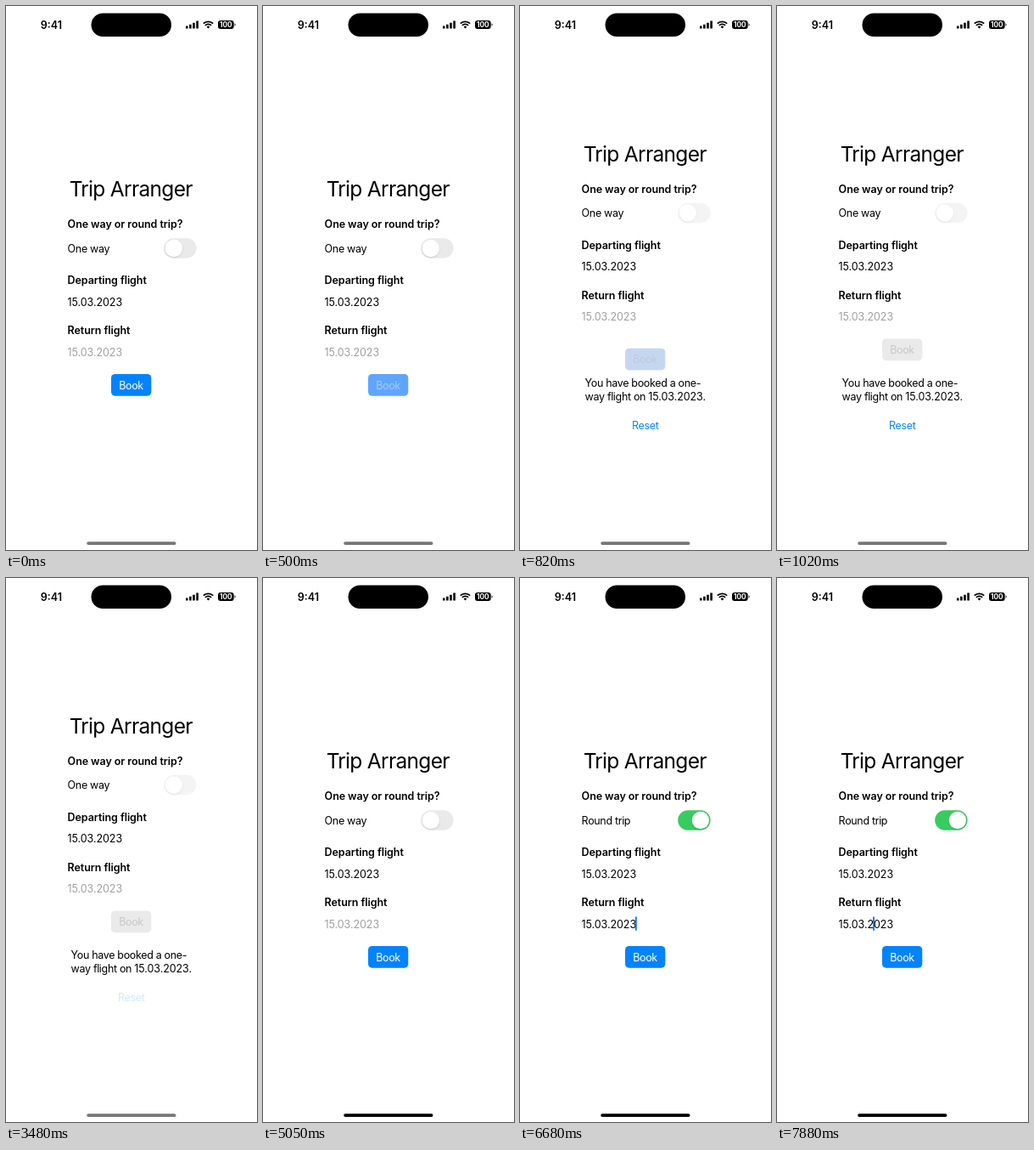
These frames come from a looping animation (296x640 px, 8 s). An HTML page:

```html
<!DOCTYPE html>
<html lang="en">
<head>
<meta charset="utf-8">
<title>Booking form</title>
<style>
  html, body { margin: 0; height: 100%; overflow: hidden; background: #fff; }
  svg { display: block; width: 100vw; height: 100vh; }
  text { font: 12.5px Inter, "Liberation Sans", sans-serif; letter-spacing: -.33px; font-optical-sizing: none; }
  .bold { font-weight: 600; letter-spacing: -.07px; }
  .date { letter-spacing: -.08px; }
  .title { font-size: 24.5px; letter-spacing: -.7px; }
  .mid { text-anchor: middle; }
  .charge { font-size: 8.3px; font-weight: 700; letter-spacing: 0; }
  #knob { filter: drop-shadow(0 1px 1px #0002); }
</style>
</head>
<body>
<svg viewBox="0 0 296 640">
  <text class="bold" x="40.8" y="26.5" style="letter-spacing:0">9:41</text>
  <rect x="100.5" y="8.5" width="94.5" height="27.5" rx="13.75"/>
  <path d="M212 23.5h2.6v3h-2.6zM216.1 21.7h2.6v4.8h-2.6zM220.2 19.7h2.6v6.8h-2.6zM224.3 17.5h2.6v9h-2.6z"/>
  <g fill="none" stroke="#000" stroke-width="1.8">
    <path d="M232.8 20.7a8 8 0 0 1 11.4 0M234.9 22.9a5 5 0 0 1 7.2 0"/>
    <path d="M238.5 26.4l-1.9-1.9a2.7 2.7 0 0 1 3.8 0z" fill="#000" stroke="none"/>
  </g>
  <rect x="250" y="16.9" width="18.7" height="10" rx="3"/>
  <path d="M269.6 20.2a2 2 0 0 1 0 3.5z"/>
  <text class="mid charge" x="259.3" y="25" fill="#fff">100</text>

  <g id="form">
    <text class="mid title" x="147.2" y="224.4">Trip Arranger</text>
    <text class="bold" x="72.6" y="261">One way or round trip?</text>
    <text id="mode" x="72.6" y="289.6"></text>
    <g id="toggle">
      <rect id="track" x="186.2" y="273.3" width="38.4" height="23.4" rx="11.7"/>
      <rect id="knob" y="274.8" height="20.4" rx="10.2" fill="#fff"/>
    </g>
    <text class="bold" x="72.6" y="327">Departing flight</text>
    <text class="date" x="72.6" y="352.6">15.03.2023</text>
    <text class="bold" x="72.6" y="386">Return flight</text>
    <text class="date" id="back" x="72.6" y="411.6">15.03.2023</text>
  </g>
  <rect id="caret" y="398.3" width="2" height="16.7" rx="1" fill="#1a7ff0"/>
  <g id="book">
    <rect id="face" x="124" y="433" width="47.3" height="25.7" rx="4.6"/>
    <text id="word" class="mid" x="147.5" y="450.5">Book</text>
  </g>
  <g id="note">
    <text x="76.6" y="447.6">You have booked a one-</text>
    <text x="76.6" y="464.4">way flight on <tspan class="date">15.03.2023.</tspan></text>
    <text id="reset" class="mid" x="147.7" y="497.8">Reset</text>
  </g>
  <rect id="home" x="95.2" y="630.2" width="105.3" height="3.7" rx="1.85"/>
</svg>
<script>
const $ = id => document.getElementById(id);
const set = (id, attrs) => {
  for (const k in attrs) $(id).setAttribute(k, attrs[k]);
};
const span = (t, a, b) => Math.min(1, Math.max(0, (t - a) / (b - a)));
const easeInOut = p => p * p * (3 - 2 * p);
const easeOut = p => 1 - (1 - p) ** 2;
const mix = (a, b, p) => `rgb(${a.map((v, i) => v + (b[i] - v) * p)})`;

const LIFT = -41.5;
const BLUE = [3, 131, 255], PRESSED = [96, 165, 253], GREY = [234, 234, 235];
const WHITE = [255, 255, 255], DIM = [200, 200, 202], GREEN = [55, 204, 96];

function caretX(t) {
  if (t < 6680 || (t >= 7300 && t < 7540)) return null;
  return t < 7650 ? 135.8 : t < 7880 ? 128 : 113;
}

function draw(t) {
  const booked = t >= 530 && t < 5050;
  const round = t >= 5260;

  set("form", { transform: `translate(0 ${booked ? LIFT : 0})` });
  set("note", { visibility: booked ? "visible" : "hidden" });
  set("reset", { fill: t >= 3480 ? "#cfeafc" : "#0a84f5" });
  set("home", { fill: t < 5050 ? "#777" : "#000" });

  const move = booked ? easeInOut(span(t, 530, 970)) : 0;
  const pressed = t >= 500 && t < 5050;
  set("book", { transform: `translate(0 ${LIFT * move})` });
  set("face", { fill: mix(pressed ? PRESSED : BLUE, GREY, move) });
  set("word", { fill: mix(pressed ? [165, 203, 254] : WHITE, DIM, move) });

  // The knob widens while it is held, then slides across.
  const slide = easeInOut(span(t, 5250, 5450));
  const width = 20.4 + 4 * (span(t, 5140, 5220) - span(t, 5350, 5470));
  set("knob", { x: 187.7 + (35.4 - width) * slide, width });
  set("track", { fill: mix(GREY, GREEN, easeOut(span(t, 5250, 5750))) });
  set("toggle", { opacity: booked ? .5 : 1 });
  $("mode").textContent = round ? "Round trip" : "One way";
  set("back", { fill: round ? "#000" : "#a0a0a0" });

  const x = caretX(t);
  set("caret", { x: x ?? 0, visibility: x === null ? "hidden" : "visible" });
}

let start;
function tick(now) {
  start ??= now;
  draw((now - start) % 8000);
  requestAnimationFrame(tick);
}
draw(0);
requestAnimationFrame(tick);
</script>
</body>
</html>
```
